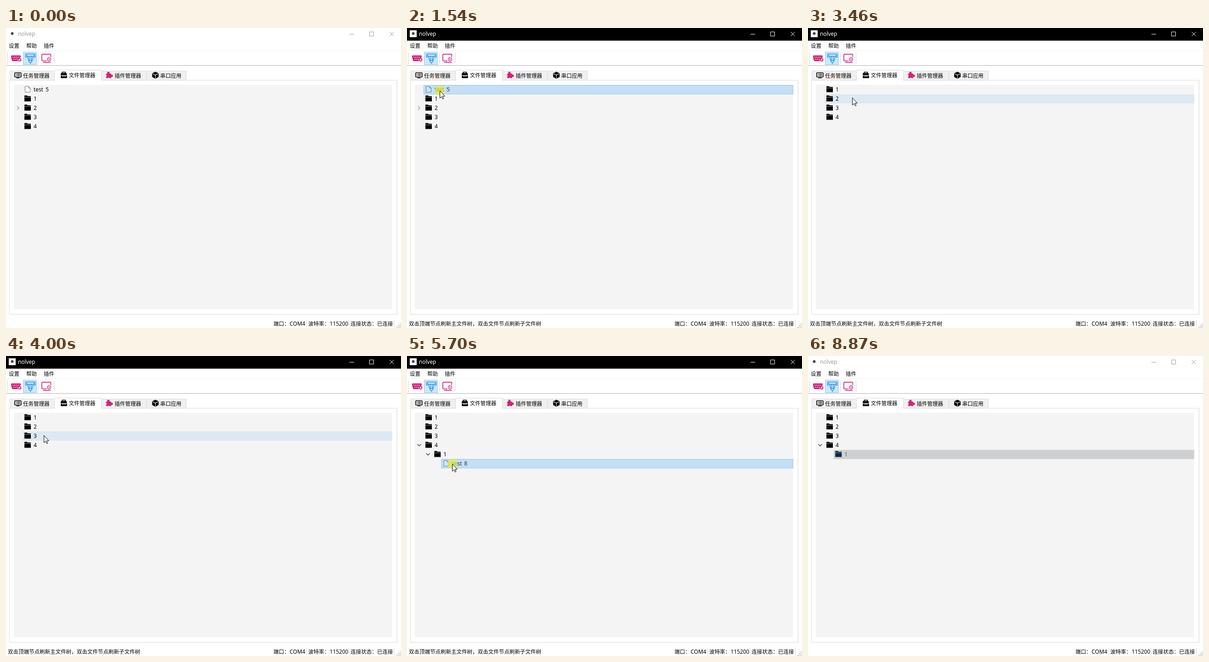
These frames come from a looping animation (858x652 px, 9020 ms). An HTML page:

```html
<!DOCTYPE html>
<html lang="zh-CN">
<head>
<meta charset="utf-8">
<title>File manager</title>
<style>
  html, body { margin: 0; width: 100%; height: 100%; overflow: hidden; background: #fff; }
  svg { display: block; width: 858px; height: 652px; }
  text {
    font: 11.8px "Noto Sans", "Noto Sans CJK SC", "Noto Sans CJK", sans-serif;
    white-space: pre;
    fill: #000;
  }
  .cjk { font: 11.5px "Noto Sans CJK SC", "Noto Sans CJK", sans-serif; }
  .line { fill: none; stroke: currentColor; }
  .pink { color: #d3227b; }
  .blue { color: #2a8fdc; }
</style>
</head>
<body>
<svg viewBox="0 0 858 652">
  <rect width="858" height="652" fill="#fff"/>

  <g id="title">
    <rect id="bar" width="858" height="27.5"/>
    <rect x="6" y="5" width="15" height="15" fill="#fff"/>
    <circle cx="13.5" cy="12" r="3" fill="#444"/>
    <text id="caption" x="26" y="17">nolvep</text>
    <path id="controls" fill="none" d="M746 13.5h10M789.5 8.5h9v9h-9zM833.5 8.5l9 9m0-9l-9 9"/>
  </g>

  <text class="cjk" x="6" y="43">设置</text>
  <text class="cjk" x="44" y="43">帮助</text>
  <text class="cjk" x="82" y="43">插件</text>

  <g id="toolbar">
    <path d="M0 49.5h858" stroke="#f0f0f0"/>
    <path d="M0 81.5h858" stroke="#c6c6c6" stroke-width="1.4"/>
    <path d="M3 54v25" stroke="#aaa" stroke-width="1.4" stroke-dasharray="1.4 2.4"/>
    <path d="M70.5 54v24M104.5 54v24" stroke="#d5d5d5"/>
    <rect x="37.5" y="52.5" width="29" height="27" fill="#cce8ff" stroke="#90c8f6"/>
    <g class="pink">
      <path fill="currentColor" d="M12.5 59.5h18q2 0 1.6 2l-1 3.5-5 2-.8 5H15q-2 0-2.4-2l-1.7-8q-.4-2.5 1.6-2.5z"/>
      <path class="line" style="color:#fff" stroke-width="1.7" stroke-dasharray="1.7 1.9" d="M14.5 63.5h15M16 68h9"/>
      <circle class="line" cx="29.6" cy="69" r="2.5" stroke-width="1.7"/>
      <circle class="line" cx="29.6" cy="69" r="3.8" stroke-width="1" stroke-dasharray="1.2 1.2"/>
    </g>
    <g class="blue line" stroke-width="1.4">
      <path d="M45 56.5h16v5H45zM47 61.5l2 9h8l2-9M50 70.5v3q3 3 6 0v-3M53 74v4M42.5 55.5v8h2.5M63.5 55.5v8H61M51 62v8M55 62v8"/>
    </g>
    <g class="pink line" stroke-width="1.7">
      <path d="M88 71.5H79.5q-1.7 0-1.7-1.7V58.5q0-1.7 1.7-1.7h16q1.7 0 1.7 1.7V63M80.5 74.6H97"/>
      <path d="M93.5 64l3.6 2v4l-3.6 2-3.6-2v-4z" stroke-width="1.3"/>
      <circle cx="93.5" cy="68" r="1.1" stroke-width="1"/>
    </g>
  </g>

  <g id="pane">
    <rect x="7.5" y="113.5" width="841.5" height="508.5" fill="#fff" stroke="#dcdcdc"/>
    <path d="M850 114v509H8" fill="none" stroke="#ececec"/>
    <rect x="17" y="123.5" width="821.5" height="487.5" fill="#f4f4f4"/>
  </g>

  <g id="tabs">
    <g fill="#f0f0f0" stroke="#d9d9d9">
      <path d="M8.5 113.5v-20h97v20zM207.5 113.5v-20h98v20zM305.5 113.5v-20h86v20z"/>
      <path d="M105.5 114.5v-23h102v23" fill="#fff"/>
    </g>
    <path d="M106 113.8h101" stroke="#fff" stroke-width="1.6"/>

    <rect x="18.8" y="97.2" width="14" height="9.3" rx="1" fill="none" stroke="#000" stroke-width="1.6"/>
    <path d="M21.5 100.3h1.6m1.2 0h6M21.5 103.3h1.6m1.2 0h6M22.5 108.4h7" stroke="#000" stroke-width="1.5"/>
    <text class="cjk" x="37" y="107.5">任务管理器</text>

    <path d="M122 98v-2.3h7V98" fill="none" stroke="#000" stroke-width="1.5"/>
    <path d="M119.5 97.8h12l1 5h-14zM119 104h4v1.5h2V104h2v1.5h2V104h3.500v5H119z"/>
    <text class="cjk" x="136.500" y="107">文件管理器</text>

    <g class="pink" fill="currentColor">
      <rect x="217.500" y="99" width="11" height="10" rx="1"/>
      <circle cx="222.500" cy="97.700" r="2.700"/>
      <circle cx="229.700" cy="103.800" r="2.600"/>
    </g>
    <path d="M217 102.500a1.800 1.800 0 0 1 0 3.600zM221 109.500a1.800 1.800 0 0 1 3.600 0z" fill="#f0f0f0"/>
    <text class="cjk" x="236" y="107.5">插件管理器</text>

    <path d="M324.500 95l7 3.500v8l-7 3.800-7-3.800v-8z"/>
    <path d="M318.500 99.300l6 3 6-3M324.500 102.300v7" fill="none" stroke="#f0f0f0" stroke-width="1.1"/>
    <text class="cjk" x="335" y="107.5">串口应用</text>
  </g>

  <g id="tree"></g>

  <text id="status" class="cjk" x="4" y="647">双击顶端节点刷新主文件树，双击文件节点刷新子文件树</text>
  <text class="cjk" x="581" y="647">端口：</text><text x="616" y="647">COM4</text>
  <text class="cjk" x="656.500" y="647">波特率：</text><text x="703" y="647">115200</text>
  <text class="cjk" x="748.500" y="647">连接状态：已连接</text>
  <path d="M652.500 634v17M745.500 634v17M843.500 634v17" stroke="#dcdcdc"/>
  <path d="M855 643.500h2M851.500 647h2m1.500 0h2M848 650.500h2m1.500 0h2m1.500 0h2" stroke="#b4b4b4" stroke-width="2"/>

  <circle id="press" r="10.8" fill="#e9e934" fill-opacity=".7"/>
  <path id="pointer" d="M.5.7v15.800l3.600-3.400 2.500 5.200 2.100-.9-2.400-5.200h4.900z" fill="#fff" stroke="#000"/>
</svg>

<script>
const LOOP = 9020, TICKS = 117;
const ROW_TOP = 124, ROW_H = 20, INDENT = 19.2;
const $ = id => document.getElementById(id);

// Rows: [id, label, depth, arrow]
const file = (id, label, depth) => [id, label, depth, ''];
const dir = (id, depth = 0, arrow = '') => [id, id.slice(-1), depth, arrow];
const plain = ['1', '2', '3'].map(id => dir(id));
const closed = [...plain, dir('4')];
const opened = [...plain, dir('4', 0, 'down'), dir('4/1', 1)];
const deep = [...plain, dir('4', 0, 'down'), dir('4/1', 1, 'down'), file('t8', 'test 8', 2)];
const initial = [file('t5', 'test 5', 0), dir('1'), dir('2', 0, 'right'), dir('3'), dir('4')];

// Step tables: [tick, value], each value holds until the next entry
const trees = [[0, initial], [42, closed], [64, opened], [69, deep], [88, opened]];
const selection = [[0, ''], [20, 't5'], [42, ''], [61, '4'], [67, '4/1'], [74, 't8'], [88, '4/1']];
const active = [[0, false], [20, true], [115, false]];
const status = [[0, false], [9, true], [24, false], [35, true], [79, false], [86, true], [111, false]];
const busy = [[0, false], [24, true], [35, false], [79, true], [88, false]];
const pointerOn = [[0, false], [7, true], [112, false]];
const presses = [20, 22, 61, 63, 67, 69, 74, 77];

// Pointer path: [tick, x, y]
const path = [
  [7, 400, 520], [9, 210, 290], [11, 120, 172], [12, 105, 157], [15, 105, 157],
  [18, 71, 136], [25, 71, 136], [29, 183, 175], [31, 168, 152], [33, 140, 136], [34, 140, 136],
  [36, 113, 176], [43, 113, 176], [47, 78, 126], [49, 70, 148], [52, 82, 172], [55, 76, 181],
  [58, 63, 186], [64, 63, 186], [67, 83, 213], [70, 83, 213], [72, 98, 234],
  [78, 98, 234], [81, 126, 248], [83, 122, 235], [84, 122, 235], [86, 140, 260], [87, 140, 260],
  [92, 158, 278], [103, 158, 278], [104, 146, 266], [105, 146, 266],
  [108, 400, 410], [111, 804, 633]
];

const at = (table, tick) => table.filter(e => e[0] <= tick).pop()[1];

function pointerAt(tick) {
  const i = path.findIndex(p => p[0] >= tick);
  if (i < 0) return path[path.length - 1].slice(1);
  if (i === 0) return path[0].slice(1);
  const [t0, x0, y0] = path[i - 1], [t1, x1, y1] = path[i];
  const u = (tick - t0) / (t1 - t0);
  return [Math.round(x0 + (x1 - x0) * u), Math.round(y0 + (y1 - y0) * u)];
}

const folderIcon = picked => `
  <path d="M40 3.500q0-1 1-1h4.500l1.500 1.500h6q1 0 1 1v10.500H40z" fill="${picked ? '#0b2a42' : '#000'}"/>
  <path d="M40 6.300h14" stroke="${picked ? '#8fb4d0' : '#b9a9ad'}" stroke-width=".9"/>`;

const fileIcon = picked => `
  <path d="M41.500 3h7.500l3.500 3.500v9h-11zM49 3v3.500h3.500" fill="${picked ? '#cbe5fa' : '#fff'}"
    stroke="${picked ? '#527da3' : '#777'}"/>`;

const arrows = {
  '': '',
  right: '<path d="M24 6l4 4-4 4" fill="none" stroke="#999" stroke-width="1.3"/>',
  down: '<path d="M22.500 7.500l4 4 4-4" fill="none" stroke="#444" stroke-width="1.4"/>'
};

function rowMarkup([id, label, depth, arrow], i, hovered, picked, focused) {
  const dx = depth * INDENT, left = 36.5 + dx;
  let back = '';
  if (hovered || picked) {
    const fill = !picked ? '#dce9f4' : focused ? '#c4dff6' : '#cfd0d1';
    const box = hovered && picked
      ? `x="${left}" y=".5" width="${838.5 - left}" height="19" stroke="#8ec5ee"`
      : `x="${left}" width="${839 - left}" height="20"`;
    back = `<rect ${box} fill="${fill}"/>`;
  }
  const icon = id[0] === 't' ? fileIcon(picked) : folderIcon(picked);
  const ink = picked ? (focused ? '#2b3238' : '#555') : '#000';
  return `<g transform="translate(0 ${ROW_TOP + i * ROW_H})">${back}
    <g transform="translate(${dx} 0)">${arrows[arrow]}${icon}
    <text x="60" y="14" style="fill:${ink};word-spacing:2px">${label}</text></g></g>`;
}

function draw(tick) {
  const focused = at(active, tick), shown = at(pointerOn, tick);
  const [x, y] = pointerAt(tick);
  const rows = at(trees, tick), picked = at(selection, tick);
  const hover = shown && !at(busy, tick) ? Math.floor((y - ROW_TOP) / ROW_H) : -1;

  $('bar').setAttribute('fill', focused ? '#000' : '#fff');
  $('caption').style.fill = focused ? '#fff' : '#999';
  $('controls').setAttribute('stroke', focused ? '#fff' : '#999');
  $('tree').innerHTML = rows
    .map((row, i) => rowMarkup(row, i, i === hover, row[0] === picked, focused)).join('');
  $('status').style.display = at(status, tick) ? '' : 'none';

  const place = `translate(${x} ${y})`;
  $('pointer').setAttribute('transform', place);
  $('pointer').style.display = shown ? '' : 'none';
  $('press').setAttribute('transform', place);
  $('press').style.display = presses.includes(tick) ? '' : 'none';
}

const start = performance.now();
let last = -1;
function frame() {
  const ms = (performance.now() - start) % LOOP;
  const tick = Math.min(TICKS - 1, Math.floor(ms / LOOP * TICKS + 0.3));
  if (tick !== last) draw(last = tick);
  requestAnimationFrame(frame);
}
frame();
</script>
</body>
</html>
```
